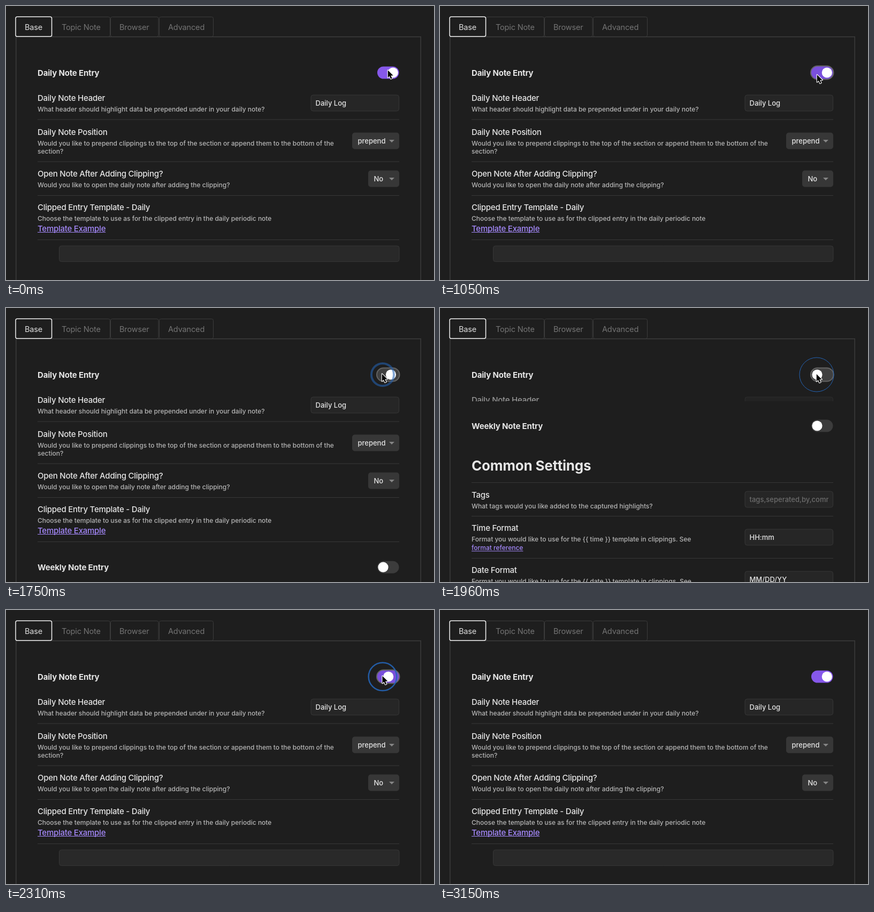
Write an HTML page with a canvas that moves like this. It is 800 by 514 pixels and loops after 3220 ms.

```html
<!DOCTYPE html>
<html lang="en">
<head>
<meta charset="utf-8">
<title>Daily note settings</title>
<style>
  html, body { margin: 0; width: 100%; height: 100%; overflow: hidden; background: #1e1e1e; }
  canvas { display: block; width: 800px; height: 514px; }
</style>
</head>
<body>
<canvas id="stage"></canvas>
<script>
const W = 800, H = 514, LOOP = 3220, STEP = 70;
const TOP = 162.5;          // top edge of the collapsible section
const FULL = 513;           // its open height
const SLIDE = 400;
const OFF_AT = 1676, ON_AT = 2180;
const PRESSES = [1610, 2069];
const LINE = '#383838', LINK = '#a488fa', BRIGHT = '#e6e6e6', SOFT = '#b6b6b6';

const canvas = document.getElementById('stage');
const ctx = canvas.getContext('2d');
const dpr = window.devicePixelRatio || 1;
canvas.width = W * dpr;
canvas.height = H * dpr;

const FONT = 'Inter, Roboto, sans-serif';
const STYLES = {
  tab:   ['400 14.5px ', -0.15],
  bold:  ['700 15px ', -0.17],
  title: ['450 15px ', -0.25],
  desc:  ['450 12px ', 0],
  field: ['450 13px ', 0],
  head:  ['700 26px ', -0.2]
};

const clamp = v => Math.max(0, Math.min(1, v));
const cubicOut = p => 1 - (1 - p) ** 3;
const smooth = p => p * p * (3 - 2 * p);
const mix = (a, b, p) => a + (b - a) * p;

function text(str, x, y, style, color) {
  const [font, gap] = STYLES[style];
  ctx.font = font + FONT;
  ctx.letterSpacing = gap + 'px';
  ctx.fillStyle = color;
  ctx.fillText(str, x, y);
  return ctx.measureText(str).width;
}

function link(str, x, y, style) {
  const w = text(str, x, y, style, LINK);
  ctx.fillRect(x, y + 1.5, w, 1);
}

function box(x, y, w, h, r, fill, stroke, lw = 1) {
  ctx.beginPath();
  ctx.roundRect(x, y, w, h, r);
  if (fill) { ctx.fillStyle = fill; ctx.fill(); }
  if (stroke) { ctx.strokeStyle = stroke; ctx.lineWidth = lw; ctx.stroke(); }
}

function rule(y) {
  ctx.fillStyle = LINE;
  ctx.fillRect(59, y - 0.5, 676, 1);
}

function setting(name, y, ...lines) {
  text(name, 59, y, 'title', BRIGHT);
  lines.forEach((s, i) => text(s, 59, y + 20 + i * 15.5, 'desc', SOFT));
}

function input(y, value, color = BRIGHT) {
  box(570, y, 164.5, 30, 4, '#262626', '#363636');
  ctx.save();
  ctx.beginPath();
  ctx.rect(571, y, 155, 30);
  ctx.clip();
  text(value, 578.5, y + 20, 'field', color);
  ctx.restore();
}

function select(x, y, value) {
  box(x, y, 735 - x, 31, 5, '#373737');
  text(value, x + 10.5, y + 20.5, 'field', BRIGHT);
  ctx.fillStyle = '#858585';
  ctx.beginPath();
  ctx.moveTo(716, y + 13.5);
  ctx.lineTo(726, y + 13.5);
  ctx.lineTo(721, y + 18.5);
  ctx.fill();
}

function toggle(y, on, hover, tint = on) {
  const shade = hover ? [[64, 64, 64], [122, 80, 220]] : [[60, 60, 60], [134, 88, 234]];
  const rgb = shade[0].map((c, i) => Math.round(mix(c, shade[1][i], tint)));
  if (hover) box(692, y - 13.5, 44.5, 27, 13.5, '#646464');
  box(694, y - 11.5, 40.5, 23, 11.5, `rgb(${rgb})`);
  ctx.fillStyle = '#fff';
  ctx.beginPath();
  ctx.arc(mix(705, 723.3, on), y, 9.6, 0, 7);
  ctx.fill();
}

function tabs() {
  ctx.fillStyle = '#3b3b3b';
  ctx.fillRect(18, 57, 758, 1.5);
  ctx.fillRect(18, 57, 1.5, H);
  ctx.fillRect(774.5, 57, 1.5, H);
  const rest = [['Topic Note', 86, 194.5, 104], ['Browser', 195.5, 285, 212], ['Advanced', 286.5, 387.5, 303]];
  for (const [name, x0, x1, tx] of rest) {
    box(x0, 20.5, x1 - x0, 37, 3, null, '#3b3b3b');
    text(name, tx, 45, 'tab', '#747474');
  }
  box(18, 20.3, 67.5, 37, 3, '#1e1e1e', '#f0f0f0', 1.5);
  text('Base', 35, 45, 'tab', '#dedede');
}

function daily(h) {
  ctx.save();
  ctx.beginPath();
  ctx.rect(0, TOP, W, h);
  ctx.clip();
  ctx.globalAlpha = clamp(h / FULL * 25);
  setting('Daily Note Header', 178, 'What header should highlight data be prepended under in your daily note?');
  input(167, 'Daily Log');
  rule(213);
  setting('Daily Note Position', 241.5,
    'Would you like to prepend clippings to the top of the section or append them to the bottom of the',
    'section?');
  select(647, 237.5, 'prepend');
  rule(292);
  setting('Open Note After Adding Clipping?', 320, 'Would you like to open the daily note after adding the clipping?');
  select(677, 308.5, 'No');
  rule(355.5);
  setting('Clipped Entry Template - Daily', 383,
    'Choose the template to use as for the clipped entry in the daily periodic note');
  link('Template Example', 59, 422.5, 'title');
  rule(438.5);
  box(99.5, 450, 635.5, 29.5, 4, '#292929', '#363636');
  ctx.restore();
}

function common(h) {
  ctx.save();
  ctx.translate(0, h);
  text('Weekly Note Entry', 59, 214, 'bold', BRIGHT);
  toggle(208.5, 0, false);
  text('Common Settings', 59, 292, 'head', BRIGHT);
  rule(315);
  setting('Tags', 343, 'What tags would you like added to the captured highlights?');
  input(331.5, 'tags,seperated,by,commas', '#6c6c6c');
  rule(378);
  ['time', 'date'].forEach((kind, i) => {
    const y = 405.5 + i * 79;
    const name = kind === 'time' ? 'Time Format' : 'Date Format';
    setting(name, y, `Format you would like to use for the {{ ${kind} }} template in clippings. See`);
    link('format reference', 59, y + 36, 'desc');
    input(y - 3, kind === 'time' ? 'HH:mm' : 'MM/DD/YY');
    rule(y + 51.5);
  });
  ctx.restore();
}

function clickRing(t) {
  for (const start of PRESSES) {
    const age = t - start;
    if (age < 0 || age > 400) continue;
    ctx.globalAlpha = clamp(0.1 + age / 300);
    ctx.strokeStyle = '#2463b4';
    ctx.lineWidth = Math.max(1, 6 - age * 0.0145);
    ctx.beginPath();
    ctx.arc(704, 125, 13.7 + age * 0.0524, 0, 7);
    ctx.stroke();
    ctx.globalAlpha = 1;
  }
}

const PATH = [
  [0, 713, 119.5], [200, 713, 120], [1050, 704, 128], [1400, 702, 122.5],
  [1750, 702, 122.5], [1960, 703, 123], [2590, 702.5, 122.5], [2800, 690, 530]
];

function pointerAt(t) {
  const i = PATH.findIndex(k => k[0] > t);
  if (i < 0) return [690, 530];
  const a = PATH[i - 1], b = PATH[i];
  const p = smooth((t - a[0]) / (b[0] - a[0]));
  return [mix(a[1], b[1], p), mix(a[2], b[2], p)];
}

function pointer(x, y) {
  ctx.save();
  ctx.translate(x, y);
  ctx.beginPath();
  const arrow = [[0.8, 1], [0.8, 14.8], [3.9, 11.9], [6.2, 17.2], [8.6, 16.2], [6.3, 11], [10.7, 10.9]];
  arrow.forEach(p => ctx.lineTo(...p));
  ctx.closePath();
  ctx.strokeStyle = '#fff';
  ctx.lineWidth = 2.2;
  ctx.lineJoin = 'round';
  ctx.stroke();
  ctx.fillStyle = '#000';
  ctx.fill();
  ctx.restore();
}

function sectionHeight(t) {
  if (t < OFF_AT) return FULL;
  if (t < ON_AT) return FULL * (1 - cubicOut(clamp((t - OFF_AT) / SLIDE)));
  return FULL * cubicOut(clamp((t - ON_AT) / SLIDE));
}

function switchState(t, span) {
  return t < ON_AT ? 1 - smooth(clamp((t - OFF_AT) / span)) : smooth(clamp((t - ON_AT) / span));
}

function draw(t) {
  ctx.setTransform(dpr, 0, 0, dpr, 0, 0);
  ctx.fillStyle = '#1e1e1e';
  ctx.fillRect(0, 0, W, H);
  const h = sectionHeight(t);
  const [px, py] = pointerAt(t);
  tabs();
  text('Daily Note Entry', 59, 130.5, 'bold', BRIGHT);
  if (h > 0) daily(h);
  common(h);
  toggle(125, switchState(t, 250), t >= STEP && py < 139, switchState(t, STEP));
  clickRing(t);
  pointer(px, py);
}

function frame(now) {
  draw(Math.floor((now % LOOP) / STEP) * STEP);
  requestAnimationFrame(frame);
}
draw(0);
requestAnimationFrame(frame);
</script>
</body>
</html>
```
